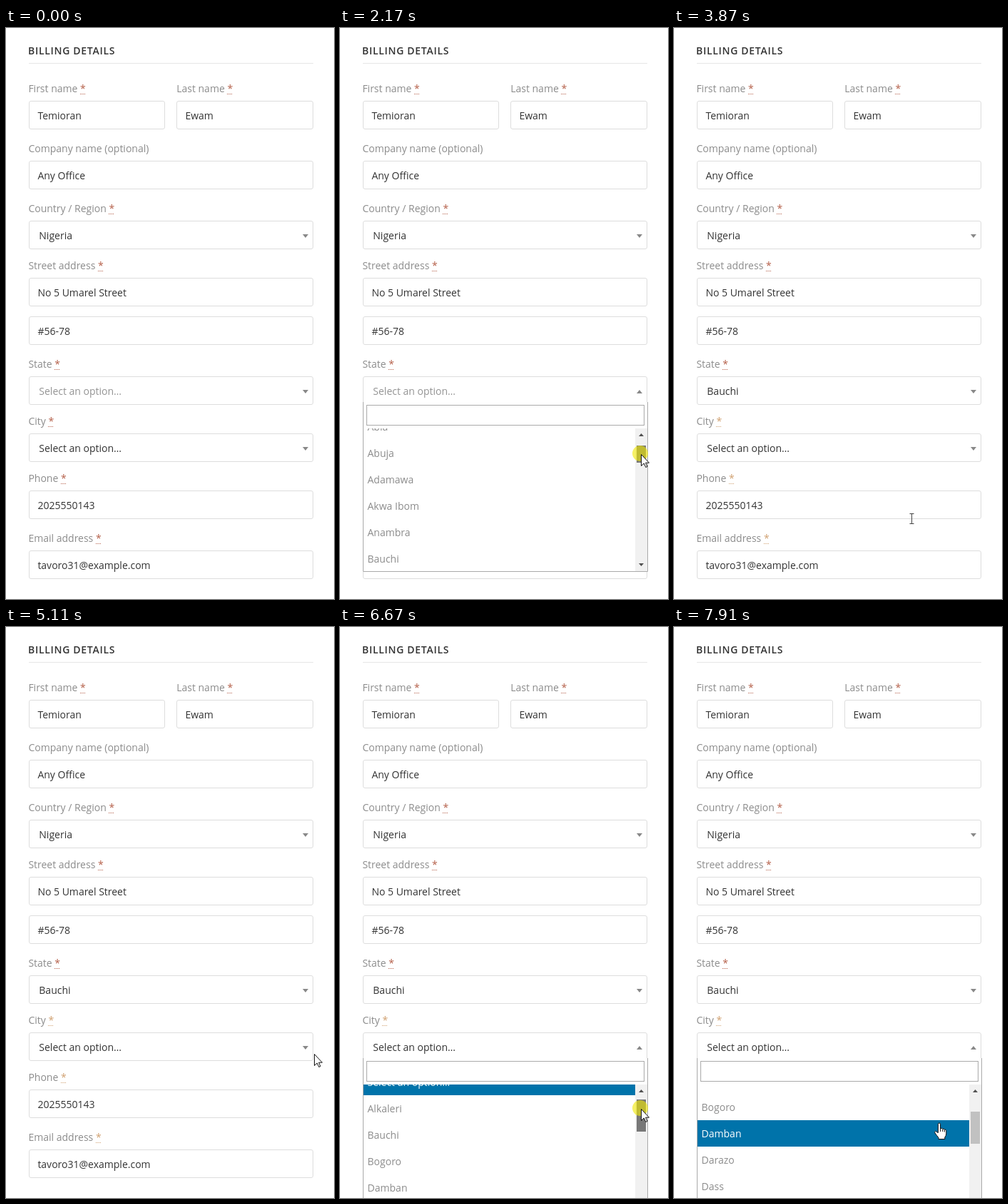
These frames come from a looping animation (460x800 px, 8000 ms). An HTML page:

```html
<!DOCTYPE html>
<html lang="en">
<head>
<meta charset="utf-8">
<title>Billing details</title>
<style>
  html, body { margin: 0; width: 100%; height: 100%; overflow: hidden; background: #fff; }
  svg { display: block; width: 460px; height: 800px; font: 14px "Open Sans", "Noto Sans", sans-serif; }
  .title { font-weight: 600; letter-spacing: .7px; fill: #333; }
  .label, .item { fill: #8c8c8c; }
  .star { fill: #b5604a; }
  .dots { stroke: #b5604a; stroke-dasharray: 1 1; }
  .late .star { fill: #d0a070; }
  .late .dots { stroke: #d0a070; }
  .value { fill: #333; }
  .hint { fill: #949494; }
  .box { fill: #fff; stroke: #ddd; }
  .caret { fill: #888; }
  .frame { fill: #fff; stroke: #aaa; }
</style>
</head>
<body>
<svg viewBox="0 0 460 800">
  <g id="form"></g>
  <g id="panels"></g>
  <circle id="press" r="11" fill="#f0e800" opacity=".6"/>
  <g id="cursor" stroke-linejoin="round">
    <path id="arrow" d="M.5.5V16.5L4.3 13 6.8 18.5 9 17.5 6.6 12.2H11.5Z" fill="#fff" stroke="#111"/>
    <g id="hand" fill="#fff" stroke="#111">
      <path d="M-1.6 13.5V1.6a1.6 1.6 0 0 1 3.2 0V8l1-.6q1.6-.4 2.2.9q1.8-.5 2.6.8q2-.4 2.4 1.4V15q-.2 3-2 5v2.5H-1V20.5q-2-2.4-5-6.5q-1-1.8.6-2.4q1.4-.2 3.2 1.9Z"/>
      <path d="M1.6 8v4M4.8 8.5v3.5M7.4 9.5v3" fill="none"/>
    </g>
    <path id="beam" d="M-2.5-6.5h2.5h3.5M-2.5 7.5h6M.5-6.5v14" fill="none" stroke="#444"/>
  </g>
</svg>
<script>
const LOOP = 8000, ROW = 37, VIEW = 200, TRACK = 166, BAR_X = 414;
const $ = id => document.getElementById(id);
const show = (el, on) => el.setAttribute('display', on ? 'inline' : 'none');
const clamp = (v, lo, hi) => Math.min(hi, Math.max(lo, v));

const label = (text, x, y, cls = '') =>
  `<g class="${cls}"><text class="label" x="${x}" y="${y}">${text} <tspan class="star">*</tspan></text>
   <path class="dots" data-y="${y + 2.5}"/></g>`;
const box = (x, y, w = 398) => `<rect class="box" x="${x + .5}" y="${y + .5}" width="${w}" height="39" rx="2.5"/>`;
const input = (text, y, x = 32, w = 398) =>
  box(x, y, w) + `<text class="value" x="${x + 12.4}" y="${y + 26}">${text}</text>`;
const caretDown = y => `M416 ${y + 19}h8l-4 5z`;
const caretUp = y => `M416 ${y + 24}h8l-4-5z`;
const select = (text, y, id, cls = 'value') =>
  box(32, y) + `<text id="${id}Text" class="${cls}" x="46.3" y="${y + 26}">${text}</text>
  <path id="${id}Caret" class="caret" d="${caretDown(y)}"/>`;

$('form').innerHTML = `
  <text class="title" x="31" y="37">BILLING DETAILS</text>
  <path d="M32 49.5H431" stroke="#e6e6e6"/>
  ${label('First name', 31.4, 90)}${input('Temioran', 102, 32, 190)}
  ${label('Last name', 239.2, 90)}${input('Ewam', 102, 239, 191)}
  <text class="label" x="31.4" y="174">Company name (optional)</text>${input('Any Office', 186)}
  ${label('Country / Region', 31.4, 258)}${select('Nigeria', 270, 'country')}
  ${label('Street address', 31.4, 338)}${input('No 5 Umarel Street', 350)}${input('#56-78', 404)}
  ${label('State', 31.4, 476)}${select('Select an option…', 488, 'state', 'hint')}
  ${label('City', 31.4, 556, 'lower')}${select('Select an option…', 568, 'city')}
  ${label('Phone', 31.4, 636, 'lower')}${input('2025550143', 648)}
  ${label('Email address', 31.4, 720, 'lower')}${input('tavoro31@example.com', 732)}`;

// Dotted underline below each required mark
document.querySelectorAll('.dots').forEach(dots => {
  const text = dots.previousElementSibling;
  const x = Math.round(text.getStartPositionOfChar(text.getNumberOfChars() - 1).x);
  dots.setAttribute('d', `M${x} ${dots.dataset.y}h8`);
});

const dropdowns = [
  { id: 'state', y: 488, rows: 37, thumb: 24, open: 510, close: 3710, grab: 1460, drop: 2700,
    items: ['Lagos', 'Abia', 'Abuja', 'Adamawa', 'Akwa Ibom', 'Anambra', 'Bauchi', 'Bayelsa', 'Benue'] },
  { id: 'city', y: 568, rows: 20, thumb: 45, open: 5500, close: LOOP, grab: 6400, drop: 7440,
    items: ['Select an option…', 'Alkaleri', 'Bauchi', 'Bogoro', 'Damban', 'Darazo', 'Dass', 'Gamawa'] }
];

for (const d of dropdowns) {
  d.top = d.y + 73;
  d.max = d.rows * ROW - VIEW;
  d.travel = TRACK - d.thumb;
  const { id, y, top } = d;
  $('panels').insertAdjacentHTML('beforeend', `<g id="${id}Panel">
    <path d="M32 ${y + 36}h400v238h-400z" fill="#fff"/>
    <path d="M32.5 ${y + 36}v237.5h399v-237.5" fill="none" stroke="#aaa"/>
    <rect class="frame" x="37.5" y="${y + 40.5}" width="389" height="28"/>
    <clipPath id="${id}Clip"><rect x="33" y="${top}" width="381" height="${VIEW}"/></clipPath>
    <g clip-path="url(#${id}Clip)"><g id="${id}List">
      <rect id="${id}Mark" x="33" width="381" height="${ROW}" fill="#0073aa"/>
      ${d.items.map((s, i) => `<text class="item" x="38.5" y="${top + i * ROW + 24}">${s}</text>`).join('')}
    </g></g>
    <rect x="${BAR_X}" y="${top}" width="17" height="${VIEW}" fill="#f1f1f1"/>
    <path id="${id}Up" d="M419 ${top + 11}h7l-3.5-4z"/>
    <path d="M419 ${top + 189}h7l-3.5 4z" fill="#505050"/>
    <rect id="${id}Thumb" x="416" width="13" height="${d.thumb}"/></g>`);
  d.texts = [...$(id + 'List').querySelectorAll('text')];
}

// Pointer path: time, x, y
const path = [
  [70, 445, 560], [440, 422, 512], [760, 422, 512], [1290, 421, 590], [1600, 421, 590],
  [1690, 422, 590], [1850, 422, 592], [2630, 423, 603], [2700, 423, 603], [2850, 404, 607],
  [3010, 391, 620], [3500, 340, 688], [3710, 340, 688], [3870, 333, 687], [4500, 423, 654],
  [4960, 436, 606], [5110, 432, 598], [5350, 421, 590], [5750, 421, 590], [6300, 422, 670],
  [6500, 422, 670], [6670, 422, 675], [7370, 422, 692], [7440, 422, 692], [7910, 372, 695]
];
const presses = [[440, 580], [1460, 2700], [3500, 3640], [5350, 5560], [6400, 7440]];

function pointerAt(t) {
  let i = path.findIndex(p => p[0] > t);
  if (i < 0) return path[path.length - 1].slice(1);
  if (i === 0) return path[0].slice(1);
  const [t0, x0, y0] = path[i - 1], [t1, x1, y1] = path[i];
  const k = (t - t0) / (t1 - t0);
  return [Math.round(x0 + (x1 - x0) * k), Math.round(y0 + (y1 - y0) * k)];
}

const isOpen = (d, t) => t >= d.open && t < d.close;

function pointerKind(x, y, t) {
  if (x < 32 || x >= 431) return 'arrow';
  const within = (top, h) => y >= top && y < top + h;
  const d = dropdowns.find(d => isOpen(d, t));
  if (d && within(d.y + 36, 238)) {
    if (within(d.y + 40, 29) && x < 427) return 'beam';
    return y >= d.top && x < BAR_X ? 'hand' : 'arrow';
  }
  if (dropdowns.some(d => within(d.y, 40))) return 'hand';
  return within(648, 40) || within(732, 40) ? 'beam' : 'arrow';
}

function updateDropdown(d, t, x, y, pressed) {
  const { id } = d, open = isOpen(d, t);
  show($(id + 'Panel'), open);
  $(id + 'Caret').setAttribute('d', open ? caretUp(d.y) : caretDown(d.y));
  if (!open) return;

  const dragged = t < d.grab ? 0 : pointerAt(Math.min(t, d.drop))[1] - pointerAt(d.grab)[1];
  const scroll = Math.round(clamp(dragged / d.travel, 0, 1) * d.max);
  const thumbY = d.top + 17 + Math.floor(scroll / d.max * d.travel);
  const hovering = x < BAR_X && y >= d.top;
  const active = hovering ? Math.floor((y - d.top + scroll) / ROW) : 0;
  const onThumb = x >= BAR_X && x < 431 && y >= thumbY && y < thumbY + d.thumb;

  $(id + 'List').setAttribute('transform', `translate(0 ${-scroll})`);
  $(id + 'Mark').setAttribute('y', d.top + active * ROW);
  d.texts.forEach((text, i) => text.style.fill = i === active ? '#fff' : '');
  $(id + 'Up').setAttribute('fill', scroll ? '#505050' : '#a3a3a3');
  $(id + 'Thumb').setAttribute('y', thumbY);
  $(id + 'Thumb').setAttribute('fill', !onThumb ? '#c1c1c1' : pressed ? '#787878' : '#a8a8a8');
}

function render(t) {
  const [x, y] = pointerAt(t);
  const pressed = presses.some(([from, to]) => t >= from && t < to);
  const chosen = t >= dropdowns[0].close;

  $('stateText').textContent = chosen ? 'Bauchi' : 'Select an option…';
  $('stateText').setAttribute('class', chosen ? 'value' : 'hint');
  document.querySelectorAll('.lower').forEach(g => g.classList.toggle('late', chosen));
  dropdowns.forEach(d => updateDropdown(d, t, x, y, pressed));

  const kind = pointerKind(x, y, t);
  for (const name of ['arrow', 'hand', 'beam']) show($(name), name === kind);
  show($('cursor'), t >= path[0][0]);
  $('cursor').setAttribute('transform', `translate(${x} ${y})`);
  show($('press'), pressed);
  $('press').setAttribute('cx', x - 1);
  $('press').setAttribute('cy', y - 1);
}

const start = performance.now();
function tick() {
  render((performance.now() - start) % LOOP);
  requestAnimationFrame(tick);
}
tick();
</script>
</body>
</html>
```
